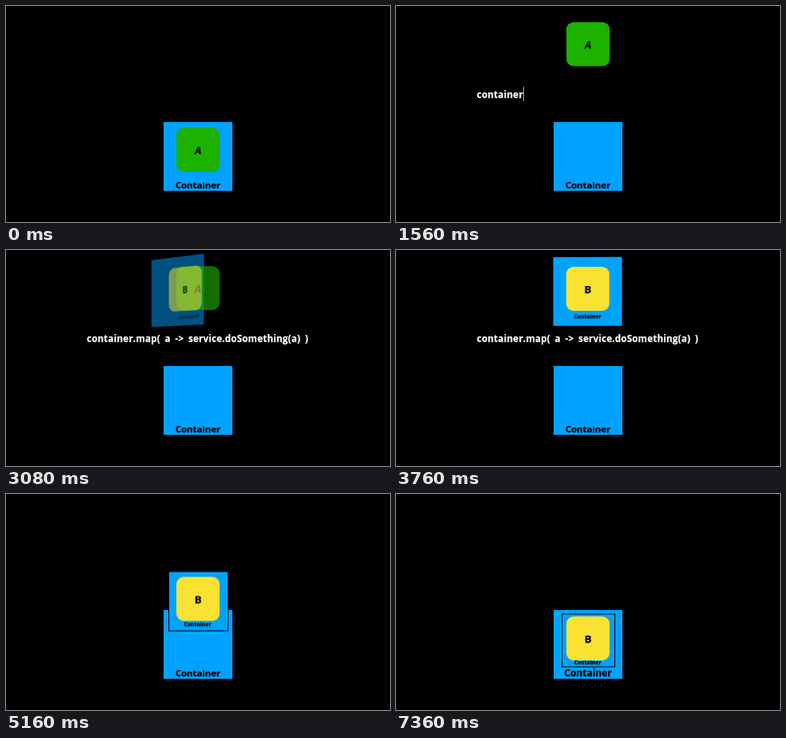
Recreate the animation shown at these times as an HTML page. Size 480 by 270 pixels, loop 8 s.

```html
<!DOCTYPE html>
<html lang="en">
<head>
<meta charset="utf-8">
<title>Mapping a container</title>
<style>
  html, body { margin: 0; width: 100%; height: 100%; overflow: hidden; background: #000; }
  #stage { position: relative; width: 480px; height: 270px; overflow: hidden;
           font: bold 11.4px "Open Sans", "Noto Sans", sans-serif; -webkit-text-stroke: .25px; }
  #stage > * { position: absolute; box-sizing: border-box; }
  .box { background: #00a2ff; border: 1px solid #000; }
  .tile { left: 213px; top: 0; width: 54px; height: 55px; border-radius: 9px;
          font-size: 13px; line-height: 56px; text-align: center; }
  #outer { left: 196px; top: 144px; width: 88px; height: 88px; }
  #caption { left: 210px; top: 215px; width: 60px; line-height: 17px; text-align: center; }
  #a { background: #1db100; font-style: italic; }
  #b { background: #fae232; }
  #label { left: 222px; top: 0; width: 35px; height: 10px; font-size: 6.9px; line-height: 10px; text-align: center; }
  #code { left: 101px; top: 101px; height: 18px; line-height: 19px; font-size: 11.5px;
          color: #fff; white-space: pre; letter-spacing: .25px; word-spacing: 2.5px; }
  #cursor { position: absolute; left: 100%; top: 0; width: 1px; height: 18px; background: #aaa; }
</style>
</head>
<body>
<div id="stage">
  <div id="outer" class="box"></div>
  <div id="caption">Container</div>
  <div id="inner" class="box"></div>
  <div id="a" class="tile">A</div>
  <div id="b" class="tile">B</div>
  <div id="label">Container</div>
  <div id="code"><span id="typed"></span><span id="cursor"></span></div>
</div>
<script>
const LOOP = 8000;
const CODE = "container.map( a -> service.doSomething(a) )";
const el = id => document.getElementById(id);
const [caption, inner, a, b, label, code, typed, cursor] =
  ["caption", "inner", "a", "b", "label", "code", "typed", "cursor"].map(el);

const ramp = (t, from, to) => Math.min(1, Math.max(0, (t - from) / (to - from)));
const ease = p => (1 - Math.cos(Math.PI * p)) / 2;
const mix = (from, to, p) => from + (to - from) * p;

function draw(t) {
  // A leaves its container, then dissolves
  a.style.transform = `translateY(${mix(152.3, 20.2, ease(ramp(t, 0, 945)))}px)`;
  a.style.opacity = 1 - ramp(t, 2900, 3380);

  // Typed call
  typed.textContent = CODE.slice(0, Math.round(CODE.length * ease(ramp(t, 1312, 2138))));
  cursor.style.opacity = t < 1280 ? 0 : 1 - ramp(t, 2080, 2200);
  code.style.opacity = 1 - ramp(t, 3970, 4370);

  // The result swings in, each part around its own centre,
  // and later drops into the empty container
  const p = ramp(t, 2900, 3840);
  const swing = Math.sin(2.25 * Math.PI * p) * (1 - p);
  const pose = `translateX(${-38 * swing}%) perspective(950px) ` +
               `skewY(${-6.3 * swing}deg) rotateY(${-51 * swing}deg)`;
  const drop = ease(ramp(t, 4622, 5550));
  const size = mix(88, 67, drop);
  inner.style.width = inner.style.height = size + "px";
  const place = (part, from, to) => {
    part.style.opacity = ramp(t, 2900, 3260);
    part.style.transform = `translateY(${mix(from, to, drop)}px) ${pose}`;
  };
  inner.style.left = 240 - size / 2 + "px";
  inner.style.top = -size / 2 + "px";
  place(inner, 51.8, 182.5);
  place(b, 21, 153);
  place(label, 78.5, 206);

  caption.style.transform = `scale(${mix(1, 1.05, ease(ramp(t, 6650, 7370)))})`;
}

const start = performance.now();
function tick() {
  draw((performance.now() - start) % LOOP);
  requestAnimationFrame(tick);
}
tick();
</script>
</body>
</html>
```
